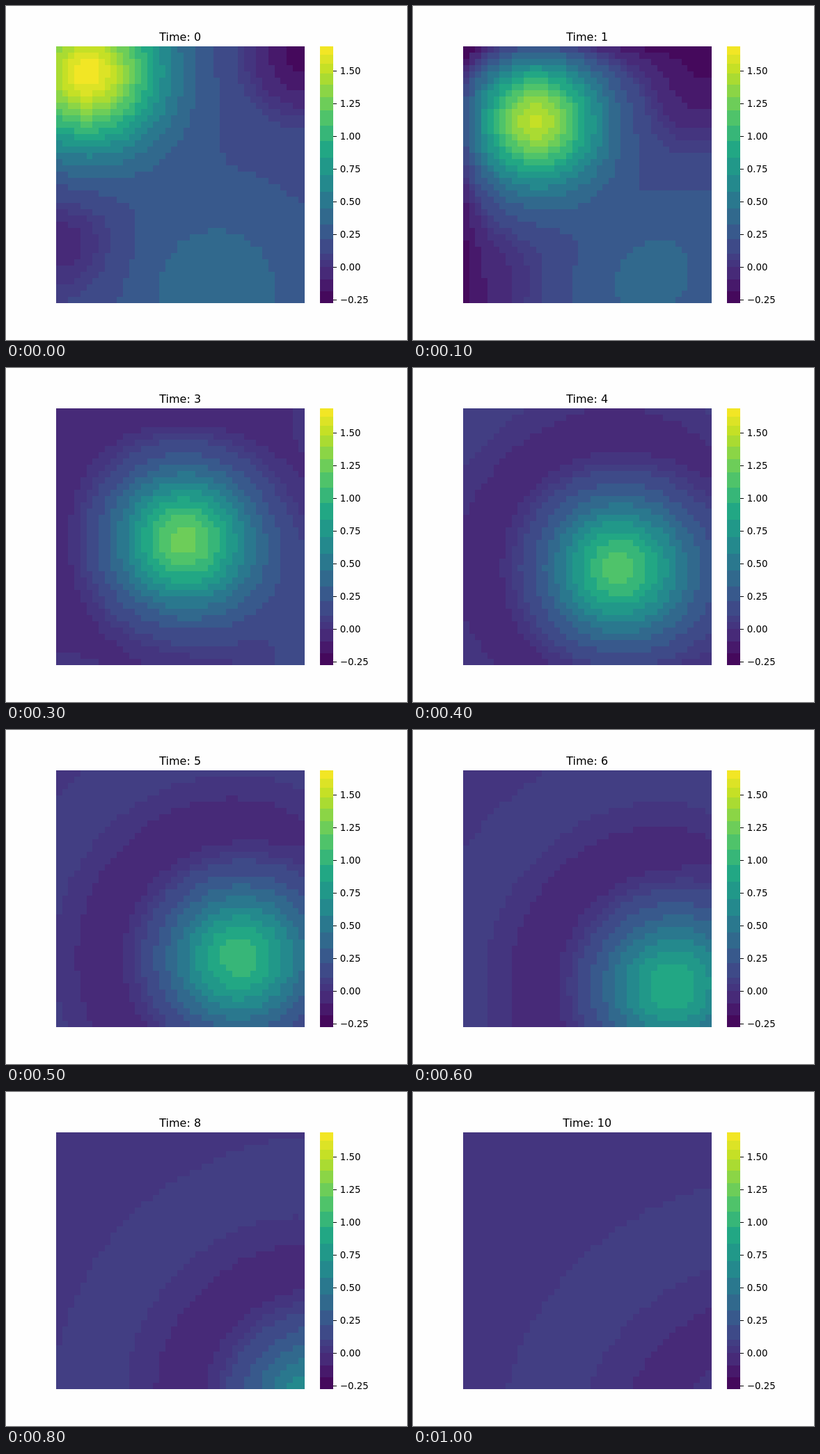
Animation of 576x480 px, one loop 1100 ms. Source, as an HTML page:

```html
<!DOCTYPE html>
<html lang="en">
<head>
<meta charset="utf-8">
<title>Heat map</title>
<style>
  html, body { margin: 0; width: 100%; height: 100%; overflow: hidden; background: #fefefe; }
  svg { display: block; font-family: "DejaVu Sans", sans-serif; }
  rect { shape-rendering: crispEdges; }
</style>
</head>
<body>
<svg id="stage" width="576" height="480" viewBox="0 0 576 480">
  <g id="cells"></g>
  <g id="bar"></g>
  <text id="title" x="250.2" y="50" font-size="16" text-anchor="middle"></text>
</svg>
<script>
const N = 41, STEP = 100, STEPS = 11, BANDS = 19;
const LEFT = 72, TOP = 57.6, RIGHT = 429.1, BOTTOM = 427.2;
const MIN = -0.277, MAX = 1.69;

const VIRIDIS = ['440154', '482475', '414487', '355f8d', '2a788e', '21918c',
  '22a884', '44bf70', '7ad151', 'bddf26', 'fde725']
  .map(hex => [0, 2, 4].map(i => parseInt(hex.substr(i, 2), 16)));

const { exp, hypot, min, floor, round, sin, PI } = Math;
const mix = (a, b, k) => a + (b - a) * k;
const bell = (distance, width) => exp(-((distance / width) ** 2) / 2);

// Colour bands: wider in the middle of the scale than at its ends
const edges = Array.from({ length: BANDS + 1 }, (_, i) => {
  const p = i / BANDS;
  return mix(MIN, MAX, p - 0.04 * sin(2 * PI * p) + 0.13 * p * (1 - p));
});
edges.splice(4, 0, (edges[3] + edges[4]) / 2); // one more shade just above zero

function viridis(value) {
  const p = (value - MIN) / (MAX - MIN) * 10;
  const i = min(9, floor(p));
  return `rgb(${VIRIDIS[i].map((c, n) => round(mix(c, VIRIDIS[i + 1][n], p - i)))})`;
}

const colors = edges.slice(1).map((top, i) => viridis((edges[i] + top) / 2));

function colorOf(value) {
  let i = 0;
  while (i < colors.length - 1 && value >= edges[i + 1]) i++;
  return colors[i];
}

// A hot spot drifts to the lower right and cools, with a cold and a mild ring around it
function fieldAt(t) {
  const kick = exp(-3 * t);
  const settled = 1 - exp(-t / 2);
  const cold = exp(-t * t / 3);
  const rim = 0.31 * t * exp((1 - t * t) / 3);
  const ambient = 0.015 + 0.155 * exp(-t * t / 6);

  const hotX = 138 + 39 * t - 21 * kick;
  const hotY = 125 + 40.6 * t - 29 * kick;
  const heat = 1.45 - 0.09 * t + 0.06 * kick;
  const size = 62 + t + 13 * kick;
  const trough = 0.16 * settled * exp(-t / 10);

  return (x, y) => {
    const r = hypot(x - hotX, y - hotY);
    const near = (cx, cy, width) => bell(hypot(x - cx, y - cy), width);
    return ambient
      + heat * bell(r, size)
      - trough * bell(r - 190, 40)
      + 0.06 * settled * bell(r - 230 - 12 * t, 60)
      + 0.24 * exp(-t / 6) * near(300 + 40 * t, 410 - 25 * t, 95)
      - 0.4 * cold * near(430, 70 + 45 * t, 58)
      - 0.22 * cold * near(85 + 35 * t, 340 + 80 * t, 60)
      - rim * (exp((LEFT - x) / 30) + exp((TOP - y) / 30));
  };
}

function add(parent, name, attrs, text = '') {
  const el = document.createElementNS('http://www.w3.org/2000/svg', name);
  for (const key in attrs) el.setAttribute(key, attrs[key]);
  el.textContent = text;
  return parent.appendChild(el);
}

const byId = id => document.getElementById(id);
const colX = i => round(mix(LEFT, RIGHT, i / N));
const rowY = i => round(mix(TOP, BOTTOM, i / N));
const barY = v => mix(BOTTOM, TOP, (v - MIN) / (MAX - MIN));

const cells = [];
for (let row = 0; row < N; row++) {
  for (let col = 0; col < N; col++) {
    const x = colX(col), y = rowY(row);
    const width = colX(col + 1) - x, height = rowY(row + 1) - y;
    const el = add(byId('cells'), 'rect', { x, y, width, height });
    cells.push({ el, x: x + width / 2, y: y + height / 2 });
  }
}

colors.forEach((fill, i) => {
  const y = round(barY(edges[i + 1]));
  add(byId('bar'), 'rect', { x: 451, y, width: 19, height: round(barY(edges[i])) - y, fill });
});
for (let v = -0.25; v <= 1.5; v += 0.25) {
  const y = floor(barY(v));
  add(byId('bar'), 'rect', { x: 470, y, width: 5, height: 1 });
  add(byId('bar'), 'text', { x: 479.8, y: y + 5, 'font-size': 13.333 },
    v.toFixed(2).replace('-', '\u2212'));
}

let shown = -1;
function draw(now) {
  const t = floor(now / STEP) % STEPS;
  if (t === shown) return;
  shown = t;
  const field = fieldAt(t);
  for (const c of cells) c.el.setAttribute('fill', colorOf(field(c.x, c.y)));
  byId('title').textContent = `Time: ${t}`;
}

const origin = performance.now();
function tick() {
  draw(performance.now() - origin);
  requestAnimationFrame(tick);
}
tick();
</script>
</body>
</html>
```
